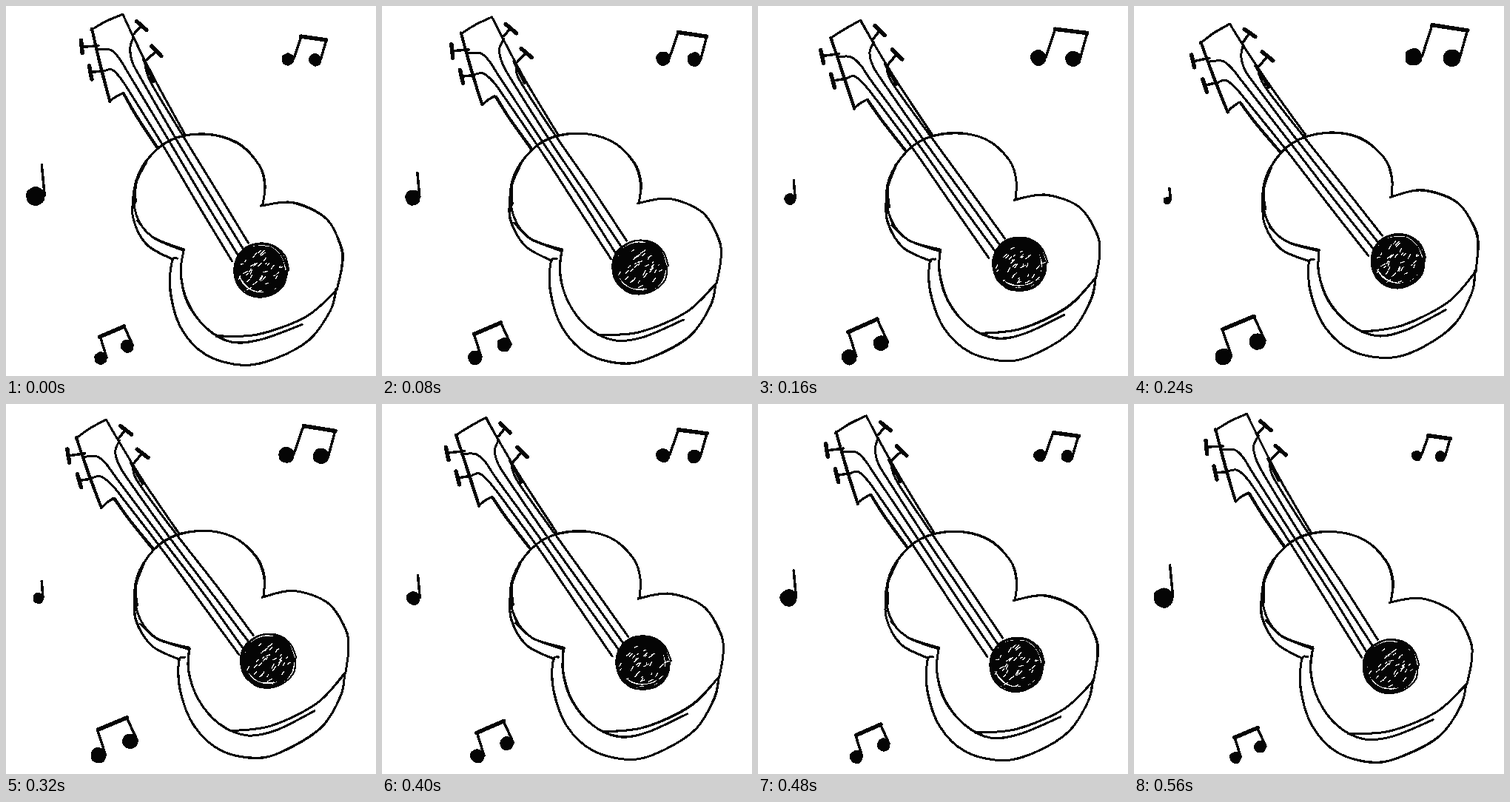
An HTML page that plays this animation: 500 px wide and 500 px high, repeating every 640 ms.

```html
<!DOCTYPE html>
<html lang="en">
<head>
<meta charset="utf-8">
<title>Guitar doodle</title>
<style>
html, body { margin: 0; width: 100%; height: 100%; overflow: hidden; background: #fff; }
svg { display: block; width: 100vw; height: 100vh; }
path { fill: none; stroke: #050505; stroke-linecap: round; stroke-linejoin: round; shape-rendering: crispEdges; }
.solid { fill: #050505; }
.fleck { stroke: #fff; }
</style>
</head>
<body>
<svg id="stage" viewBox="0 0 500 500"></svg>
<script>
const STEP = 80, STEPS = 8, DRAWINGS = 3;
const TURN = 3, LAST = STEPS - 1;
const stage = document.getElementById('stage');

// Key points of each pen stroke: "width x y x y ..."
const body = [
  '3 240 329 198 312 177 283 174 245 189 210 222 181 268 173 313 185 342 215 350 243 347 269',
  '3 345 270 388 266 432 287 453 325 454 352 447 383',
  '3 447 383 405 420 340 444 284 446',
  '3 240 329 236 360 245 400 270 435 305 454 345 451 400 430',
  '3 173 250 172 285 190 322 226 343',
  '2.5 177 290 200 314 240 331',
  '3 232 341 224 345 222 385 236 435 270 471 320 486 365 476 410 451 438 412 446 383',
  '4 189 210 176 238 175 265'
];
const neck = [
  '3 115 32 135 21 158 11',
  '4 116 31 128 82 140 129',
  '3 140 129 148 123 158 118',
  '3 158 11 173 44 200 98 241 173',
  '4 186 72 199 102',
  '4 159 119 175 147 204 191'
];
// Where each string curls away from its peg.
const curls = [
  [129, 89, 143, 86, 156, 98, 169, 118],
  [122, 58, 141, 59, 153, 71, 167, 95],
  [173, 41, 167, 56, 170, 75, 182, 98],
  [188, 74, 189, 88, 198, 108]
];
const pegs = [[125, 54, 102, 55], [130, 88, 114, 90], [173, 37, 183, 27], [190, 73, 203, 61]];
const hole = { x: 344, y: 357, r: 38 };

// Keys hold x, y, scale at the start, the turn and the last step.
const notes = [
  { keys: [[381, 72, 1], [378, 69, 1.4], [382, 70, 0.87]], r: 8.5,
    heads: [[0, 0], [37, 1]], tops: [[18, -31], [52, -26]] },
  { keys: [[128, 476, 1], [121, 474, 1.28], [137, 478, 0.93]], r: 8.8,
    heads: [[0, 0], [36, -16]], tops: [[-1, -29], [32, -43]] },
  { keys: [[40, 257, 1], [45, 263, 0.4], [40, 262, 1.05]], r: 13,
    heads: [[0, 0]], tops: [[8, -42]] }
];
const angles = [0, -7, -1.4];

const add = (parent, tag, attrs = {}) => {
  const el = document.createElementNS('http://www.w3.org/2000/svg', tag);
  for (const key in attrs) el.setAttribute(key, attrs[key]);
  return parent.appendChild(el);
};

function random(seed) {
  return () => (seed = (seed * 16807) % 2147483647) / 2147483647;
}

// Smooth curve through all points.
function curve(n) {
  const count = n.length / 2;
  const at = i => {
    const k = 2 * Math.max(0, Math.min(count - 1, i));
    return [n[k], n[k + 1]];
  };
  let d = `M${at(0)}`;
  for (let i = 0; i < count - 1; i++) {
    const [a, b, c, e] = [at(i - 1), at(i), at(i + 1), at(i + 2)];
    const p = [0, 1].map(j => b[j] + (c[j] - a[j]) / 6);
    const q = [0, 1].map(j => c[j] - (e[j] - b[j]) / 6);
    d += `C${p} ${q} ${c}`;
  }
  return d;
}

const ink = (parent, width, points, cls = '') =>
  add(parent, 'path', { d: curve(points), 'stroke-width': width, class: cls });

// A pen with an unsteady hand.
function makePen(parent, seed) {
  const rnd = random(seed);
  const shake = amount => (rnd() - 0.5) * 2 * amount;
  const line = (width, points, wobble = 0.6, cls = '') =>
    ink(parent, width, points.map(v => v + shake(wobble)), cls);
  const ring = (x, y, r, width, wobble, cls) => {
    const points = [];
    for (let i = 0; i <= 12; i++) {
      const a = i / 12 * 2 * Math.PI;
      points.push(x + r * Math.cos(a), y + r * Math.sin(a));
    }
    line(width, points, wobble, cls);
  };
  return { rnd, shake, line, ring };
}

function drawHole({ rnd, shake, line, ring }) {
  const { x, y, r } = hole;
  ring(x, y - 2, r * 0.8, 2, 2, 'solid');
  for (let i = 0; i < 6; i++) {
    ring(x + shake(1.5), y + shake(1.5), r * (0.82 + 0.03 * i), 2.2, 1);
  }
  for (let i = 0; i < 34; i++) {
    const a = rnd() * 2 * Math.PI, d = r * 0.85 * Math.sqrt(rnd());
    const px = x + d * Math.cos(a), py = y + 4 + d * Math.sin(a) * 0.85;
    const len = 2 + rnd() * 5, tilt = -1.2 + rnd();
    line(1.3, [px, py, px + len * Math.cos(tilt), py + len * Math.sin(tilt)], 0.5, 'fleck');
  }
}

function drawGuitar(seed) {
  const g = add(stage, 'g');
  const pen = makePen(g, seed);
  for (const stroke of [...body, ...neck]) {
    const [width, ...points] = stroke.split(' ').map(Number);
    pen.line(width, points);
    pen.line(width - 0.5, points);
  }
  curls.forEach((curl, i) => {
    const nut = [214 + 8.3 * i, 190 - 4.7 * i], end = [305 + 7.7 * i, 345 - 8.3 * i];
    const mid = nut.map((v, j) => (v + end[j]) / 2);
    pen.line(3, [...curl, ...nut, ...mid, ...end], 0.8);
  });
  for (const [x, y, tx, ty] of pegs) {
    const k = 9 / Math.hypot(tx - x, ty - y);
    const dx = (y - ty) * k, dy = (tx - x) * k;
    pen.line(3.5, [x, y, tx, ty]);
    pen.line(5.5, [tx - dx, ty - dy, tx + dx, ty + dy], 1);
  }
  drawHole(pen);
  return g;
}

const keyed = ([start, turn, last], s) => s <= TURN
  ? start + (turn - start) * s / TURN
  : turn + (last - turn) * (s - TURN) / (LAST - TURN);

function drawNote(parent, { keys, r, heads, tops }, s) {
  const [x, y, scale] = [0, 1, 2].map(i => keyed(keys.map(key => key[i]), s));
  const place = ([px, py]) => [x + px * scale, y + py * scale];
  const pen = makePen(parent, 901 + 37 * s);
  const size = r * scale;
  heads.forEach((head, i) => {
    const [hx, hy] = place(head);
    pen.ring(hx, hy, size - 1, 2, 0.6, 'solid');
    pen.line(3.5, [...place(tops[i]), hx + size - 1, hy - 1], 0.4);
  });
  if (tops.length > 1) pen.line(5.5, tops.flatMap(place), 0.6);
}

const guitars = Array.from({ length: DRAWINGS }, (_, i) => drawGuitar(77 + 1931 * i));
const noteLayer = add(stage, 'g');

function render(s) {
  guitars.forEach((g, i) => {
    g.style.display = i === s % DRAWINGS ? '' : 'none';
    g.setAttribute('transform', `rotate(${keyed(angles, s)} 250 250)`);
  });
  noteLayer.replaceChildren();
  for (const note of notes) drawNote(noteLayer, note, s);
}

const start = performance.now();
let shown = -1;
function tick() {
  const s = Math.floor((performance.now() - start) / STEP) % STEPS;
  if (s !== shown) render(shown = s);
  requestAnimationFrame(tick);
}
tick();
</script>
</body>
</html>
```
